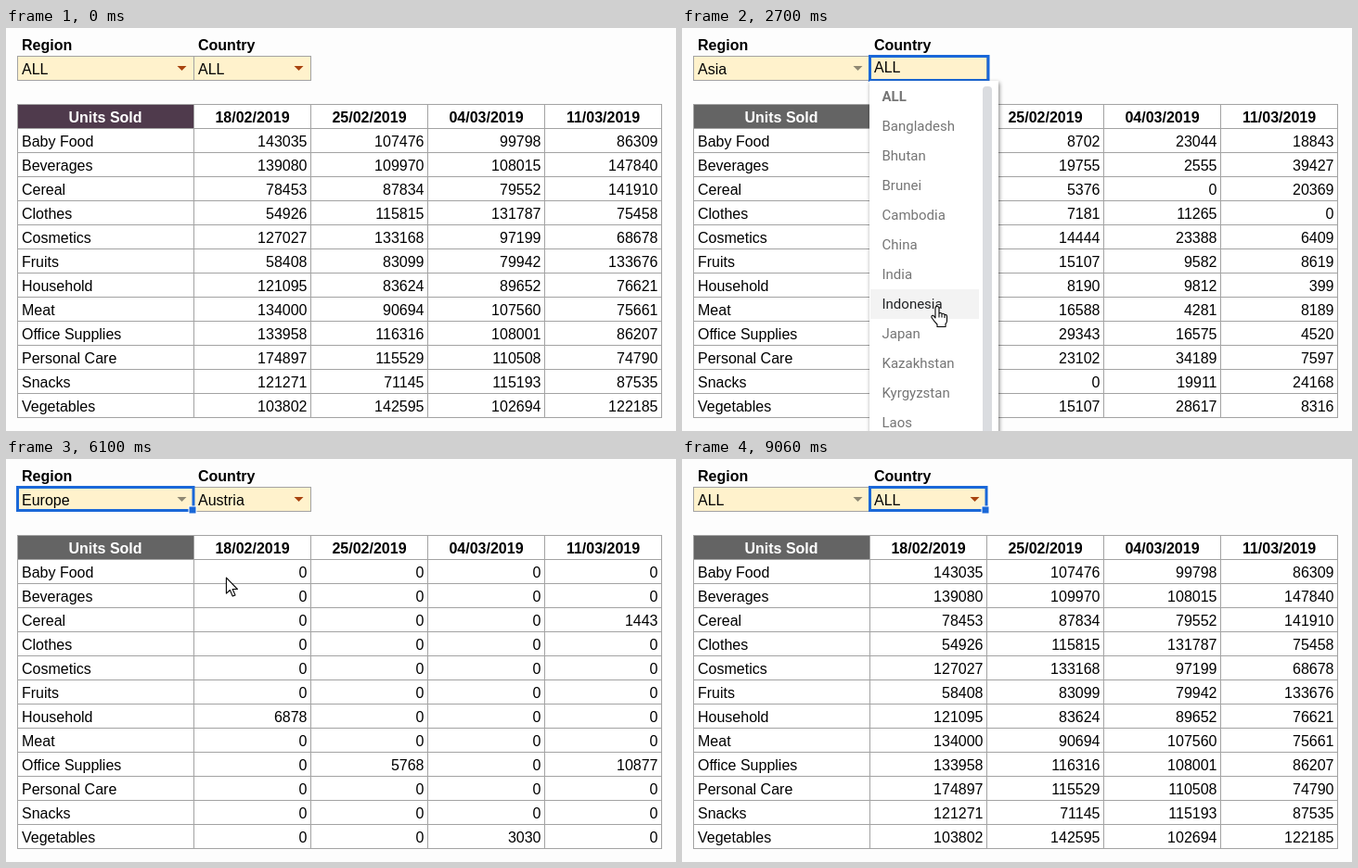
An HTML page for the animation above (9.15 s loop, 722 px wide and 435 px high).

```html
<!DOCTYPE html>
<html lang="en">
<head>
<meta charset="utf-8">
<title>Units sold by region and country</title>
<style>
html, body { margin: 0; width: 100%; height: 100%; overflow: hidden; background: #fdfdfd; }
svg { display: block; width: 722px; height: 435px; }
text { font: 16px "Liberation Sans", Arial, sans-serif; fill: #000; white-space: pre; }
.b { font-weight: 700; }
.mid { text-anchor: middle; }
.end { text-anchor: end; }
.grid { stroke: #a3a3a3; fill: none; shape-rendering: crispEdges; }
.list text { font: 15px Roboto, sans-serif; fill: #757575; }
.list .b { font-weight: 700; }
.list .on { fill: #202124; }
.card { fill: #fff; filter: drop-shadow(1px 2px 2px rgba(0, 0, 0, .5)); }
.tip text { font: 15px Roboto, sans-serif; fill: #444; }
.tip .b { font-weight: 700; fill: #e8710a; }
</style>
</head>
<body>
<svg id="stage" viewBox="0 0 722 435"></svg>
<script>
const LOOP = 9150;
const NS = 'http://www.w3.org/2000/svg';
const stage = document.getElementById('stage');

function add(parent, tag, attrs, text) {
  const el = document.createElementNS(NS, tag);
  for (const k in attrs) el.setAttribute(k, attrs[k]);
  if (text !== undefined) el.textContent = text;
  parent.appendChild(el);
  return el;
}
const set = (el, attrs) => { for (const k in attrs) el.setAttribute(k, attrs[k]); };
const show = (el, on) => el.setAttribute('visibility', on ? 'visible' : 'hidden');

// Content
const products = ['Baby Food', 'Beverages', 'Cereal', 'Clothes', 'Cosmetics', 'Fruits', 'Household',
  'Meat', 'Office Supplies', 'Personal Care', 'Snacks', 'Vegetables'];
const dates = ['18/02/2019', '25/02/2019', '04/03/2019', '11/03/2019'];
const regions = ['ALL', 'Asia', 'Australia and Oceania', 'Central America and the Caribbean', 'Europe',
  'Middle East and North Africa', 'North America', 'Sub-Saharan Africa'];
const countries = {
  ALL: ['ALL'],
  Asia: ['ALL', 'Bangladesh', 'Bhutan', 'Brunei', 'Cambodia', 'China', 'India', 'Indonesia', 'Japan',
    'Kazakhstan', 'Kyrgyzstan', 'Laos'],
  Europe: ['ALL', 'Albania', 'Andorra', 'Armenia', 'Austria', 'Belarus', 'Belgium',
    'Bosnia and Herzegovina', 'Bulgaria', 'Croatia', 'Cyprus', 'Czech Republic']
};
const rows = s => s.split('|').map(r => r.trim().split(' '));
const sales = {
  all: rows(`143035 107476 99798 86309|139080 109970 108015 147840|78453 87834 79552 141910|
    54926 115815 131787 75458|127027 133168 97199 68678|58408 83099 79942 133676|
    121095 83624 89652 76621|134000 90694 107560 75661|133958 116316 108001 86207|
    174897 115529 110508 74790|121271 71145 115193 87535|103802 142595 102694 122185`),
  asia: rows(`5221 8702 23044 18843|22663 19755 2555 39427|6923 5376 0 20369|5844 7181 11265 0|
    40389 14444 23388 6409|2371 15107 9582 8619|9765 8190 9812 399|13134 16588 4281 8189|
    7820 29343 16575 4520|37524 23102 34189 7597|18323 0 19911 24168|14577 15107 28617 8316`),
  europe: rows(`41210 37298 10963 25866|30544 15123 25177 47534|22817 17772 35937 23894|
    14063 41284 36001 8661|28911 22597 27558 24762|19307 19413 3170 28338|
    35126 46493 20888 21506|40872 10701 12131 18659|37415 41905 21058 27353|
    46230 37927 14058 26580|31754 46151 34897 26684|25098 6012 23026 60127`),
  austria: products.map(() => ['0', '0', '0', '0'])
};
sales.austria[2][3] = '1443';
sales.austria[6][0] = '6878';
sales.austria[8][1] = '5768';
sales.austria[8][3] = '10877';
sales.austria[11][2] = '3030';

// What changes, and when
const events = [
  [0, { data: 'all', region: 'ALL', country: 'ALL', sel: '', open: '', tip: false, grey: false }],
  [560, { sel: 'region' }],
  [700, { open: 'region', grey: true }],
  [1150, { region: 'Asia', open: '' }],
  [1400, { data: 'asia' }],
  [1720, { sel: 'country' }],
  [1850, { open: 'country' }],
  [3040, { open: '' }],
  [3300, { sel: 'region' }],
  [3380, { open: 'region' }],
  [3680, { region: 'Europe', open: '' }],
  [4110, { sel: 'country' }],
  [4140, { open: 'country' }],
  [4260, { data: 'europe' }],
  [5600, { country: 'Austria', open: '' }],
  [5720, { data: 'austria' }],
  [6060, { sel: 'region' }],
  [6250, { open: 'region' }],
  [7340, { region: 'ALL', open: '' }],
  [7540, { tip: true }],
  [7900, { tip: false, sel: 'country' }],
  [8010, { open: 'country' }],
  [8220, { country: 'ALL', open: '' }],
  [8340, { data: 'all' }]
];

// Pointer stops: arrive, leave, x, y
const stops = [
  [170, 170, 570, 420], [520, 720, 189, 42], [1000, 1160, 174, 102], [1520, 1570, 293, 56],
  [1700, 1860, 315, 42], [2050, 2100, 275, 72], [2700, 2700, 275, 301], [2960, 3050, 275, 418],
  [3280, 3400, 189, 42], [3620, 3700, 130, 204], [3900, 3950, 299, 46], [4060, 4160, 298, 38],
  [4440, 4600, 290, 72], [5120, 5160, 284, 360], [5500, 6010, 280, 204], [6200, 6270, 189, 42],
  [6760, 7010, 160, 150], [7280, 7350, 125, 114], [7600, 7890, 262, 42], [7970, 8020, 315, 42],
  [8190, 8230, 273, 76], [8430, 8940, 267, 76], [9050, 9050, 384, 373]
];

// Sheet
const edges = [12, 202, 328, 454, 580, 706];
const fields = {};
function addField(name, title, x, w) {
  add(stage, 'text', { x: x + 5, y: 24, class: 'b' }, title);
  add(stage, 'rect', { x: x + .5, y: 30.5, width: w, height: 26, class: 'grid', style: 'fill:#fff2cc' });
  fields[name] = {
    x, w,
    text: add(stage, 'text', { x: x + 5 }),
    arrow: add(stage, 'path', { d: `M${x + w - 17.5} 41h10l-5 5z` }),
    flag: add(stage, 'path', { d: `M${x + w - 6} 31h6v6z`, fill: '#e8710a' })
  };
}
addField('region', 'Region', 12, 190);
addField('country', 'Country', 202, 126);

add(stage, 'rect', { x: 12, y: 82, width: 694, height: 338, fill: '#fff' });
const head = add(stage, 'rect', { x: 12, y: 82, width: 191, height: 26 });
let lines = '';
for (let i = 0; i <= 13; i++) lines += `M12 ${82.5 + 26 * i}H707`;
edges.forEach(x => lines += `M${x + .5} 82V421`);
add(stage, 'path', { d: lines, class: 'grid' });
add(stage, 'text', { x: 107, y: 102, class: 'b mid', style: 'fill:#fff' }, 'Units Sold');
dates.forEach((d, i) => add(stage, 'text', { x: 265.5 + 126 * i, y: 102, class: 'b mid' }, d));
const cells = products.map((p, r) => {
  add(stage, 'text', { x: 17, y: 128 + 26 * r }, p);
  return dates.map((d, c) => add(stage, 'text', { x: 324.5 + 126 * c, y: 128 + 26 * r, class: 'end' }));
});

// Overlays
const frame = add(stage, 'rect', { fill: 'none', stroke: '#1a68d8', 'stroke-width': 3 });
const handle = add(stage, 'rect', { width: 8, height: 8, fill: '#1a68d8', stroke: '#fff', 'stroke-width': 1 });
const caret = add(stage, 'rect', { y: 34, width: 1, height: 17, fill: '#000' });
const list = add(stage, 'g', { class: 'list' });
const tip = add(stage, 'g', { class: 'tip' });
add(tip, 'rect', { x: 336, y: 33, width: 274, height: 126, rx: 2, class: 'card' });
add(tip, 'text', { x: 347, y: 62, class: 'b' }, 'Invalid:');
add(tip, 'text', { x: 347, y: 86 }, 'Input must fall within specified');
add(tip, 'text', { x: 347, y: 108 }, 'range');
const ink = { fill: '#fff', stroke: '#000', 'stroke-width': 1.1, 'stroke-linejoin': 'round' };
const arrow = add(stage, 'path', { ...ink, d: 'M0 0V17L4 13.4L6.8 20L9.6 18.8L6.8 12.4H12Z' });
const hand = add(stage, 'path', { ...ink,
  d: 'M-2 1.5Q-2-.5 0-.5Q2-.5 2 1.5V7Q4 5.8 5 7.6Q7 6.6 8 8.5Q10.5 8 10.5 10.5V15Q10.5 17 9 18.5V21.5' +
     'H0V19Q-3 16-6 11.5Q-6.5 9-4.5 9.3Q-3 10-2 12ZM2 7V11.5M5 8V11.5M8 9V12' });

function menuOf(s) {
  if (s.open === 'region') {
    return { x: 12, w: 279, items: [s.region, ...regions.filter(r => r !== s.region)], bar: 0, bold: true };
  }
  const items = countries[s.region];
  const europe = s.region === 'Europe';
  if (items.length === 1) return { x: 202, w: 129, items, bar: 0, bold: false };
  return { x: 202, w: europe ? 209 : 139, items, bar: europe ? 307 : 390, bold: true };
}

function drawList(m, hover) {
  list.replaceChildren();
  const h = m.bar ? 420 : m.items.length * 32 + 3;
  add(list, 'rect', { x: m.x, y: 57, width: m.w, height: h, class: 'card' });
  m.items.forEach((name, i) => {
    const on = i === hover;
    if (on) add(list, 'rect', { x: m.x + 1, y: 58 + 32 * i, width: m.w - (m.bar ? 22 : 1), height: 32, fill: '#f3f3f3' });
    const cls = (i === 0 && m.bold ? 'b ' : '') + (on && i ? 'on' : '');
    add(list, 'text', { x: m.x + 13.5, y: 79 + 32 * i, class: cls }, name);
  });
  if (m.bar) add(list, 'rect', { x: m.x + m.w - 17, y: 63, width: 10, height: m.bar, rx: 4, fill: '#dadce0' });
}

function drawSheet(s) {
  head.setAttribute('fill', s.grey ? '#646464' : '#4f3a4c');
  cells.forEach((row, r) => row.forEach((c, i) => { c.textContent = sales[s.data][r][i]; }));
  for (const name in fields) {
    const f = fields[name], editing = s.open === name;
    f.text.textContent = s[name];
    f.text.setAttribute('y', editing ? 48 : 50);
    show(f.arrow, !editing);
    show(f.flag, name === 'country' && s.region === 'ALL' && s.country !== 'ALL');
  }
  fields.region.arrow.setAttribute('fill', s.grey ? '#8f8873' : '#a8430f');
  show(frame, s.sel);
  show(handle, s.sel && !s.open);
  if (s.sel) {
    const f = fields[s.sel], extra = s.open ? 2 : 0;
    set(frame, { x: f.x + .5, y: 30.5, width: f.w + extra - .5, height: 25 + extra / 2 });
    set(handle, { x: f.x + f.w - 5, y: 51 });
  }
  show(tip, s.tip);
}

function pointerAt(t) {
  let prev = stops[0];
  for (const p of stops) {
    if (t < p[0]) {
      const k = Math.max(0, (t - prev[1]) / (p[0] - prev[1]));
      const e = k * k * (3 - 2 * k);
      return [prev[2] + (p[2] - prev[2]) * e, prev[3] + (p[3] - prev[3]) * e];
    }
    prev = p;
  }
  return [prev[2], prev[3]];
}

let sheetKey, listKey;
function render(t) {
  const s = {};
  let opened = 0, step = 0;
  for (const [at, change] of events) {
    if (at > t) break;
    Object.assign(s, change);
    if (change.open) opened = at;
    step = at;
  }
  if (step !== sheetKey) { drawSheet(s); sheetKey = step; }

  const [x, y] = pointerAt(t);
  let pointing = t >= 8220 && t < 8760;
  if (s.open) {
    const m = menuOf(s);
    const inside = x > m.x && x < m.x + m.w && y >= 58;
    const hover = inside ? Math.floor((y - 58) / 32) : -1;
    pointing = inside;
    const key = step + ':' + hover;
    if (key !== listKey) { drawList(m, hover); listKey = key; }
    const f = fields[s.open];
    caret.setAttribute('x', Math.round(f.x + 5 + f.text.getComputedTextLength()));
  }
  show(list, s.open);
  show(caret, s.open && (t - opened) % 1000 < 500);

  const live = t >= 170 && t < 9050;
  const over = live && x > 203 && x < 328 && y > 30 && y < 52;
  fields.country.arrow.setAttribute('fill', over ? '#8f8873' : '#a8430f');
  const move = `translate(${x.toFixed(1)} ${y.toFixed(1)})`;
  set(arrow, { transform: move });
  set(hand, { transform: move });
  show(arrow, live && !pointing);
  show(hand, live && pointing);
}

const start = performance.now();
function tick() {
  render((performance.now() - start) % LOOP);
  requestAnimationFrame(tick);
}
tick();
</script>
</body>
</html>
```
